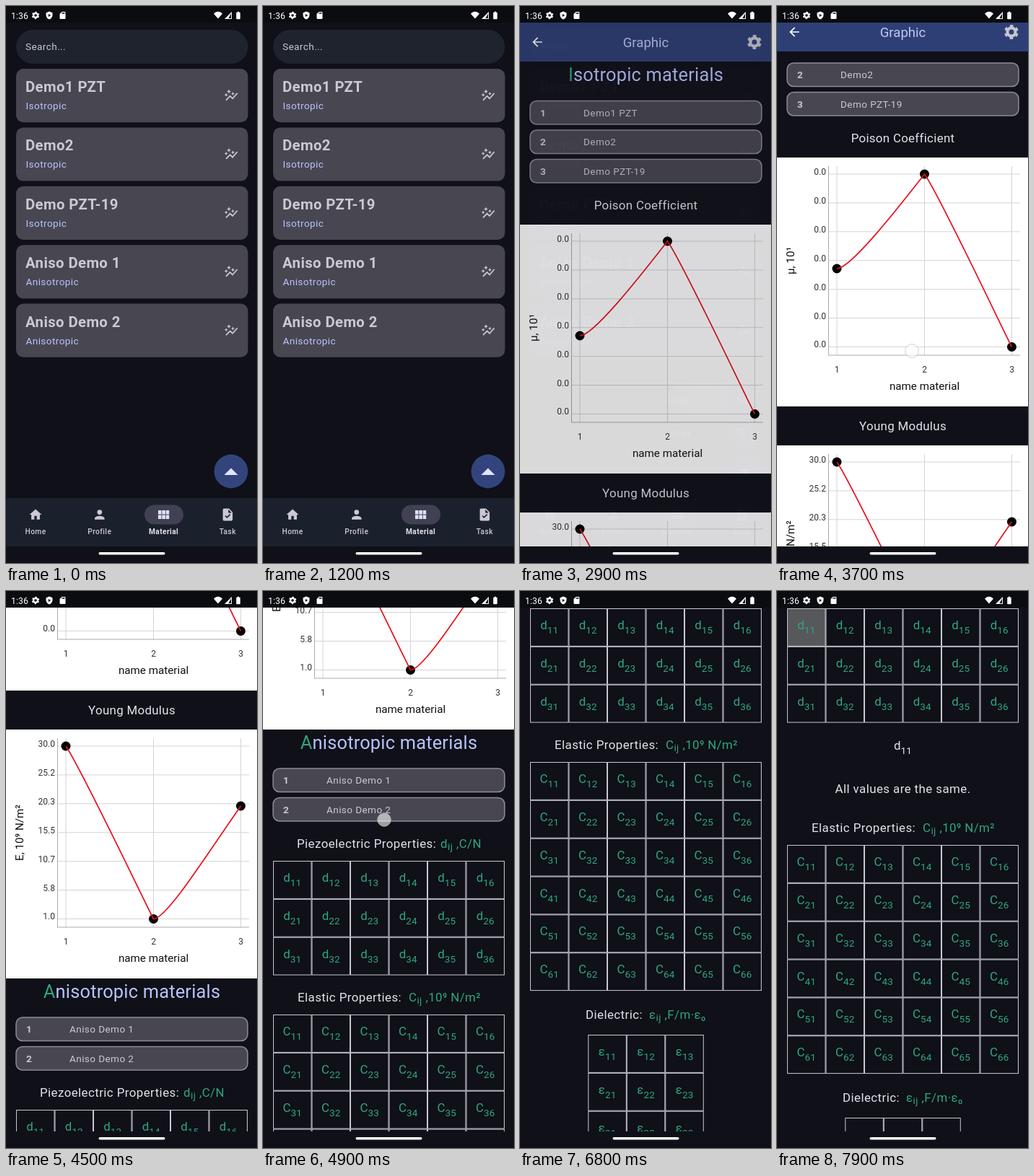
Recreate the animation shown at these times as an HTML page. Size 348x772 px, loop 8 s.

```html
<!DOCTYPE html>
<html lang="en">
<head>
<meta charset="utf-8">
<title>Material graphs</title>
<style>
  html, body { margin: 0; width: 100%; height: 100%; overflow: hidden; background: #0f1018; }
  svg { display: block; width: 100vw; height: 100vh; font-family: Roboto, "Noto Sans", sans-serif; }
</style>
</head>
<body>
<svg id="stage" viewBox="0 0 348 772"></svg>
<script>
const LOOP = 8000, STEP = 100;
const BG = '#0f1018', CARD = '#484751', LIGHT = '#e3e1e9', SOFT = '#cbc9d3';
const GREEN = '#2fa681', LILAC = '#b9c3ff', BLUE = '#33447c';

const ICONS = {
  graph: 'M14.06 9.94L12 9l2.06-.94L15 6l.94 2.06L18 9l-2.06.94L15 12zM4 14l.94-2.06L7 11l-2.06-.94L4 8l-.94 2.06L1 11l2.06.94zM8.5 9l1.09-2.41L12 5.5 9.59 4.41 8.5 2 7.41 4.41 5 5.5l2.41 1.09zM4.5 20.5l6-6.01 4 4L23 8.93l-1.41-1.41-7.09 7.97-4-4L3 19z',
  home: 'M10 20v-6h4v6h5v-8h3L12 3 2 12h3v8z',
  person: 'M12 12a4 4 0 1 0 0-8 4 4 0 0 0 0 8zm0 2c-2.67 0-8 1.34-8 4v2h16v-2c0-2.66-5.33-4-8-4z',
  grid: 'M3 5h5.3v6.5H3zM9.3 5h5.4v6.5H9.3zM15.7 5H21v6.5h-5.3zM3 12.5h5.3V19H3zM9.3 12.5h5.4V19H9.3zM15.7 12.5H21V19h-5.3z',
  task: 'M14 2H6a2 2 0 0 0-2 2v16a2 2 0 0 0 2 2h12a2 2 0 0 0 2-2V8zm-3.06 16L7.4 14.46l1.41-1.41 2.12 2.12 4.24-4.24 1.41 1.41zM13 9V3.5L18.5 9z',
  filter: 'M10 18h4v-2h-4zM3 6v2h18V6zm3 7h12v-2H6z',
  back: 'M20 11H7.83l5.59-5.59L12 4l-8 8 8 8 1.41-1.41L7.83 13H20z',
  shield: 'M12 1L3 5v6c0 5.55 3.84 10.74 9 12 5.16-1.26 9-6.45 9-12V5zM9.5 8l7 4-7 4z',
  card: 'M18 2h-8L4 8v12a2 2 0 0 0 2 2h12a2 2 0 0 0 2-2V4a2 2 0 0 0-2-2zm-6 6h-2V4h2zm3 0h-2V4h2zm3 0h-2V4h2z',
  wifi: 'M0 7.5C7-.2 17-.2 24 7.5L12 21z',
  signal: 'M2 22h20V2zm11-2h7V7z',
  battery: 'M16 4h-2V2h-4v2H8a1.3 1.3 0 0 0-1.3 1.3v15.4A1.3 1.3 0 0 0 8 22h8a1.3 1.3 0 0 0 1.3-1.3V5.3A1.3 1.3 0 0 0 16 4z'
};

const rect = (x, y, w, h, fill, r = 0, more = '') =>
  `<rect x="${x}" y="${y}" width="${w}" height="${h}" rx="${r}" fill="${fill}" ${more}/>`;
const circle = (x, y, r, fill, more = '') => `<circle cx="${x}" cy="${y}" r="${r}" fill="${fill}" ${more}/>`;
const line = (x1, y1, x2, y2, color) => `<path d="M${x1} ${y1}L${x2} ${y2}" stroke="${color}"/>`;
const text = (x, y, str, size, fill, { anchor = 'start', weight = 400, space = .42, more = '' } = {}) =>
  `<text x="${x}" y="${y}" font-size="${size}" fill="${fill}" text-anchor="${anchor}" font-weight="${weight}" letter-spacing="${space}" ${more}>${str}</text>`;
const mid = (x, y, str, size, fill, opt = {}) => text(x, y, str, size, fill, { anchor: 'middle', ...opt });
const icon = (name, x, y, size, fill) =>
  `<path transform="translate(${x - size / 2} ${y - size / 2}) scale(${size / 24})" d="${ICONS[name]}" fill="${fill}" fill-rule="evenodd"/>`;
const group = (id, body, more = '') => `<g id="${id}" ${more}>${body}</g>`;
const range = n => [...Array(n).keys()];

// Ring plus six dashes for the teeth
function gear(x, y, size, color) {
  const tooth = 2 * Math.PI * 8.2 / 12;
  return `<g transform="translate(${x} ${y}) scale(${size / 24})" fill="none" stroke="${color}">
    <circle r="5.6" stroke-width="4.2"/>
    <circle r="8.2" stroke-width="3.6" stroke-dasharray="${tooth}" transform="rotate(15)"/></g>`;
}

function statusBar() {
  return rect(0, 0, 348, 23, '#0b0c10') + text(7, 17.5, '1:36', 12.2, '#fff', { space: .1 }) +
    gear(41, 13, 12.5, '#fff') + icon('shield', 60, 13, 12, '#fff') + icon('card', 78.5, 13, 12, '#fff') +
    icon('wifi', 294, 13, 12, '#fff') + icon('signal', 308, 13, 12, '#fff') + icon('battery', 322, 13, 12.5, '#fff');
}

function materialCard([name, kind], i) {
  const y = 87 + i * 81.4;
  return rect(14, y, 321.5, 74.2, CARD, 10) +
    text(27, y + 32, name, 20.3, SOFT, { weight: 700 }) +
    text(27.5, y + 56, kind, 13.55, LILAC) + icon('graph', 312, y + 37, 20.3, SOFT);
}

function navItem([label, name], i) {
  const x = 41 + i * 88.8, on = i === 2;
  return (on ? rect(192, 691.5, 54, 27, '#404253', 13.5) : '') +
    icon(name, x, 705, 20.3, on ? '#e0e1fb' : SOFT) +
    mid(x, 731.5, label, 10.2, on ? LIGHT : SOFT, { weight: on ? 700 : 500 });
}

const menuItem = (label, name, y) =>
  text(204.5, y + 4.5, label, 13.55, LIGHT) + circle(308.7, y, 19.2, BLUE) + icon(name, 308.7, y, 20.3, '#dfe2ff');

function listPage() {
  const items = [['Demo1 PZT', 'Isotropic'], ['Demo2', 'Isotropic'], ['Demo PZT-19', 'Isotropic'],
    ['Aniso Demo 1', 'Anisotropic'], ['Aniso Demo 2', 'Anisotropic']];
  const tabs = [['Home', 'home'], ['Profile', 'person'], ['Material', 'grid'], ['Task', 'task']];
  return rect(0, 0, 348, 772, BG) + rect(14, 33, 321.5, 47, '#1e232e', 23.5) +
    text(27, 61, 'Search...', 13.55, SOFT) + items.map(materialCard).join('') +
    group('menu', rect(205, 523, 98, 46, 'url(#ripple)', 0, 'id="press"') +
      menuItem('Graph', 'graph', 546) + menuItem('Filter', 'filter', 592)) +
    circle(312, 645, 23.4, BLUE) + '<path id="arrow" fill="#e0e4ff"/>' +
    rect(0, 682, 348, 67, '#1b212c') + tabs.map(navItem).join('');
}

const title = (y, str) => mid(174.5, y + 6, str, 16.9, LIGHT, { space: .3 });
const heading = (y, first, rest) =>
  mid(174.5, y + 9, `<tspan fill="${GREEN}">${first}</tspan>${rest}`, 25.4, LILAC, { space: .2 });

function nameRow(y, n, name) {
  return rect(14, y, 321, 32.5, CARD, 9, 'stroke="#8d8c96" stroke-width="1.5"') +
    text(28, y + 21, n, 13.55, SOFT, { weight: 700 }) + text(88, y + 21, name, 13.55, SOFT);
}

function chart(top, yName, labels, ys, curve) {
  const xs = [83, 204.5, 325.5];
  let s = rect(0, 0, 348, 345, '#fff');
  labels.forEach((label, i) => {
    const y = 23 + i * 39.9;
    s += line(71, y, 337, y, '#d4d4d4') + text(68, y + 1, label, 12, '#333', { anchor: 'end', space: 0 });
  });
  xs.forEach((x, i) => {
    s += line(x, 12, x, 274, '#d4d4d4') + mid(x, 297.5, i + 1, 12, '#333', { space: 0 });
  });
  s += line(71.5, 12, 71.5, 274, '#aaa') + line(71, 274, 337, 274, '#aaa');
  s += xs.map((x, i) => circle(x, ys[i], 6.5, '#000')).join('');
  s += `<path d="${curve}" fill="none" stroke="#e8101c" stroke-width="1.7"/>`;
  s += mid(204.5, 321.5, 'name material', 15.2, '#111', { space: 0 });
  s += mid(0, 0, yName, 15.2, '#111', { space: 0, more: 'transform="translate(24 143) rotate(-90)"' });
  return `<g transform="translate(0 ${top})">${s}</g>`;
}

const sub = (letter, n, size = 13.55, dy = 6) => `${letter}<tspan font-size="${size}" dy="${dy}">${n}</tspan>`;

function property(y, name, x, gx, symbol, unit) {
  return text(x, y + 6, name, 16.9, LIGHT) +
    text(gx, y + 6, `${sub(symbol, 'ij', 13.5, 3)}<tspan dy="-3"> ${unit}</tspan>`, 16.9, GREEN);
}

function table(x0, y0, rows, cols, letter) {
  const w = 53.5, h = 52.85;
  return range(rows * cols).map(k => {
    const r = Math.floor(k / cols), c = k % cols, x = x0 + c * w, y = y0 + r * h;
    return rect(x + .5, y + .5, w - 1, h - 1, 'none', 0, 'stroke="#c9c8d2"') +
      mid(x + w / 2, y + 29, sub(letter, `${r + 1}${c + 1}`), 16.9, GREEN, { space: .1 });
  }).join('');
}

function graphPage() {
  const content =
    heading(2, 'I', 'sotropic materials') +
    nameRow(38.5, 1, 'Demo1 PZT') + nameRow(79, 2, 'Demo2') + nameRow(119.5, 3, 'Demo PZT-19') +
    title(183, 'Poison Coefficient') +
    chart(210, 'μ, 10¹', range(7).map(() => '0.0'), [154, 23, 262.5],
      'M83 154C101 154 160 80 204.5 23C224 50 306 224 325.5 262.5') +
    title(582, 'Young Modulus') +
    chart(609, 'E, 10⁹ N/m²', ['30.0', '25.2', '20.3', '15.5', '10.7', '5.8', '1.0'], [23, 262.5, 106],
      'M83 23C103 52 184 222 204.5 262.5C223 262 282 168 325.5 106') +
    heading(972, 'A', 'nisotropic materials') +
    nameRow(1008, 1, 'Aniso Demo 1') + nameRow(1048.5, 2, 'Aniso Demo 2') +
    property(1112, 'Piezoelectric Properties:', 47, 246, 'd', ',C/N') +
    rect(14, 1136, 53.5, 52.85, '#57585b', 0, 'id="cell"') + table(14, 1136, 3, 6, 'd') +
    group('detail', mid(174.5, 1332, sub('d', '11'), 16.9, LIGHT, { space: .1 }) +
      mid(174.5, 1392, 'All values are the same.', 16.9, LIGHT)) +
    group('lower',
      property(1325, 'Elastic Properties:', 48, 202, 'C', ',10⁹ N/m²') + table(14, 1349, 6, 6, 'C') +
      property(1699, 'Dielectric:', 91, 179, 'ε', ',F/m·ε₀') + table(94.3, 1727, 3, 3, 'ε'));
  const bar = rect(0, 0, 348, 54, '#2e3f75') + icon('back', 24, 27, 20.3, '#fff') +
    mid(174.5, 33.5, 'Graphic', 18.6, '#c0c7f4', { space: 0 }) + gear(325, 27, 24, '#c6c6d0');
  return rect(0, 0, 348, 772, BG) +
    `<g clip-path="url(#view)">${group('content', content)}${rect(0, 23, 348, 0, BG, 0, 'id="cover"')}${group('bar', bar)}</g>`;
}

const stage = document.getElementById('stage');
stage.innerHTML = `<defs>
  <clipPath id="view"><rect y="23" width="348" height="726"/></clipPath>
  <radialGradient id="ripple" cx=".5" cy=".5" r=".5" gradientTransform="translate(0 -.5) scale(1 2)">
    <stop offset=".45" stop-color="#66666a"/><stop offset="1" stop-color="#66666a" stop-opacity="0"/>
  </radialGradient></defs>` +
  group('list', listPage()) + group('graph', graphPage()) +
  rect(0, 749, 348, 23, '#101118') + rect(128.5, 757, 92, 3.6, '#fff', 1.8) + statusBar() +
  circle(0, 0, 9.3, '#fff', 'id="dot" fill-opacity=".6" stroke="#bbb" stroke-opacity=".7"');

const el = id => document.getElementById(id);
const ui = Object.fromEntries(
  ['list', 'graph', 'menu', 'press', 'arrow', 'content', 'cover', 'bar', 'cell', 'detail', 'lower', 'dot']
    .map(id => [id, el(id)]));

const clamp = (v, a = 0, b = 1) => Math.min(b, Math.max(a, v));
const ease = (t, a, b) => { const p = clamp((t - a) / (b - a)); return p * p * (3 - 2 * p); };

// [time, scroll offset]
const SCROLL = [[3400, -93], [3500, -76], [3700, 0], [3800, 90], [3900, 190], [4000, 268], [4100, 325],
  [4300, 392], [4500, 417], [4600, 420], [4700, 490], [4900, 762], [5000, 838], [5100, 880], [5300, 905],
  [5400, 950], [5600, 1105], [5700, 1112]];

function scrollAt(t) {
  const i = SCROLL.findIndex(k => k[0] > t);
  if (i === 0) return SCROLL[0][1];
  if (i < 0) return SCROLL[SCROLL.length - 1][1];
  const [t0, a] = SCROLL[i - 1], [t1, b] = SCROLL[i];
  return a + (b - a) * (t - t0) / (t1 - t0);
}

// [start, end, x, y, scroll while the finger is at y]; taps have no scroll
const TOUCHES = [[1700, 1800, 312, 645], [2500, 2600, 247, 551], [3400, 3900, 187, 478, 0],
  [4600, 5000, 168, 317, 762], [5300, 5700, 185, 230, 1105], [7500, 7600, 41, 48]];

const shift = (node, y) => node.setAttribute('transform', `translate(0 ${y})`);
const fade = (node, o) => {
  node.setAttribute('opacity', o);
  node.style.display = o > 0 ? '' : 'none';
};

function draw(t) {
  const scroll = scrollAt(t);
  const open = ease(t, 1700, 2100);
  const page = ease(t, 2600, 3000);

  fade(ui.menu, open);
  shift(ui.menu, 14 * (1 - open));
  ui.arrow.setAttribute('d', open > .4 ? 'M302.5 641h19l-9.5 9.5z' : 'M302.5 650h19l-9.5-9.5z');
  fade(ui.press, t >= 2500 ? 1 : 0);
  fade(ui.list, 1 - page);
  fade(ui.graph, page);

  // The app bar leaves with the scroll
  const away = clamp(scroll + 14, 0, 54);
  const bar = 54 - away;
  shift(ui.content, -scroll);
  shift(ui.bar, 23 - away);
  ui.cover.setAttribute('height', bar + Math.min(away, bar, 15));

  const grow = ease(t, 7500, 7800);
  shift(ui.lower, 115 * grow);
  fade(ui.detail, ease(t, 7600, 7800));
  fade(ui.cell, ease(t, 7400, 7700));

  const touch = TOUCHES.find(([a, b]) => t >= a && t < b);
  fade(ui.dot, touch ? 1 : 0);
  if (touch) {
    const [, , x, y, at] = touch;
    ui.dot.setAttribute('cx', x);
    ui.dot.setAttribute('cy', at === undefined ? y : y + at - scroll);
  }
}

const start = performance.now();
function tick(now) {
  const t = Math.max(0, now - start) % LOOP;
  draw(Math.floor(t / STEP) * STEP);
  requestAnimationFrame(tick);
}
draw(0);
requestAnimationFrame(tick);
</script>
</body>
</html>
```
